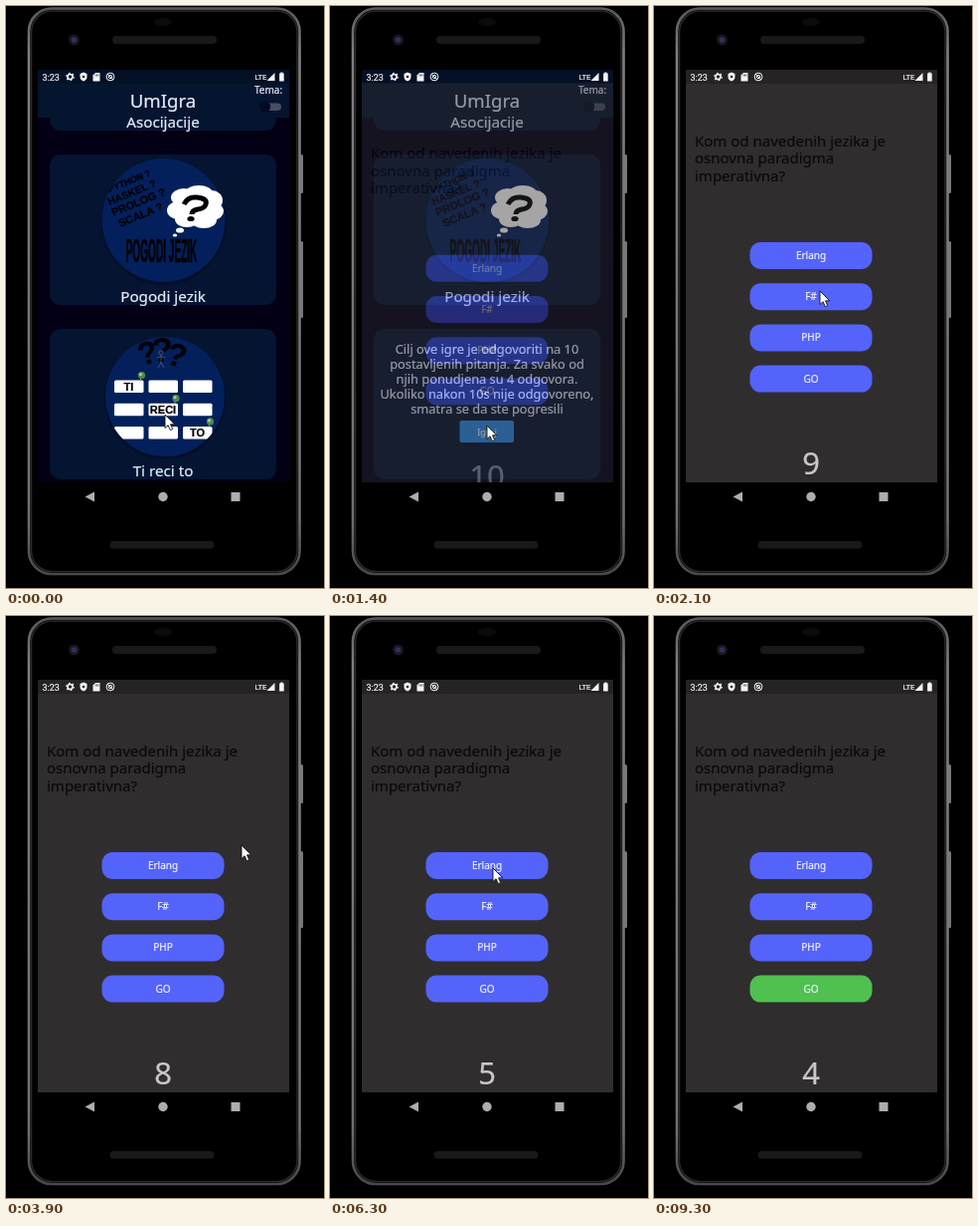
An HTML page for the animation above (9400 ms loop, 320x584 px).

```html
<!DOCTYPE html>
<html lang="sr">
<head>
<meta charset="utf-8">
<title>Quiz app</title>
<style>
html, body { margin: 0; width: 100%; height: 100%; overflow: hidden; background: #000; }
svg { display: block; width: 100vw; height: 100vh; }
text {
  font-family: "Noto Sans", sans-serif; color: #e4eaf8;
  fill: currentColor; stroke: currentColor; stroke-width: .22;
}
.mid { text-anchor: middle; }
.caption { font-size: 15.2px; }
.art text { font-family: "Liberation Sans", Arial, sans-serif; font-weight: bold; color: #020206; }
.card { fill: #041431; }
.status text { font-family: Roboto, sans-serif; color: #f4f4f4; }
.ask text { font-size: 15px; color: #0c0b0c; }
.answer text { font-size: 10px; color: #eef0ff; }
#count { font-size: 31px; color: #c9c8c9; }
</style>
</head>
<body>
<svg viewBox="0 0 320 584">
  <defs>
    <clipPath id="screen"><rect x="32" y="64" width="253" height="414"/></clipPath>
    <clipPath id="disc1"><circle cx="158.5" cy="215" r="62"/></clipPath>
    <clipPath id="disc2"><circle cx="160" cy="392" r="60"/></clipPath>
    <linearGradient id="rim" x2="0" y2="1">
      <stop offset="0" stop-color="#5a5a5c"/>
      <stop offset=".08" stop-color="#808083"/>
      <stop offset=".9" stop-color="#707073"/>
      <stop offset="1" stop-color="#48484a"/>
    </linearGradient>
  </defs>
  <rect width="320" height="584"/>

  <g id="phone">
    <rect x="295" y="149" width="4" height="39" rx="1.5" fill="#77777a"/>
    <rect x="295" y="236" width="4" height="77" rx="1.5" fill="#77777a"/>
    <rect x="23" y="2.500" width="272.500" height="567.500" rx="23" fill="#000" stroke="url(#rim)" stroke-width="2.600"/>
    <rect x="25.500" y="5" width="267.500" height="562.500" rx="21" fill="none" stroke="#28282a" stroke-width="1.500"/>
    <rect x="107" y="30" width="105" height="8" rx="4" fill="#19191c"/>
    <rect x="104.500" y="537" width="105" height="7.500" rx="3.700" fill="#19191c"/>
    <circle cx="68.500" cy="34" r="5.500" fill="#17171d"/>
    <circle cx="68.500" cy="34" r="2.800" fill="#30305c"/>
    <ellipse cx="158" cy="16" rx="9" ry="4" fill="#0b0b0d"/>
  </g>

  <g clip-path="url(#screen)">
    <g id="home">
      <rect x="32" y="64" width="253" height="414" fill="#030016"/>
      <rect class="card" x="44" y="80" width="228" height="45" rx="11"/>
      <rect x="32" y="64" width="253" height="48" fill="#05152f"/>
      <text class="mid caption" x="158" y="122">Asocijacije</text>
      <text class="mid" x="158" y="102" font-size="18.6">UmIgra</text>
      <text x="250" y="87.5" font-size="10">Tema:</text>
      <rect x="257" y="97.500" width="20" height="7.500" rx="3.700" fill="#474e62"/>
      <circle cx="260.500" cy="101" r="5.700" fill="#030b22"/>

      <rect class="card" x="44" y="149" width="228" height="151" rx="11"/>
      <g class="art">
        <circle cx="159" cy="217" r="63" fill="#020a20" opacity=".55"/>
        <circle cx="158.500" cy="215" r="62" fill="#03205c"/>
        <g id="langs" clip-path="url(#disc1)"></g>
        <g id="bubble" fill="#fff"></g>
        <path d="M179 199q4-8 13-7 11 1 9 7-1 4-8 5-6 1-6 5" fill="none" stroke="#020206" stroke-width="5"/>
        <ellipse cx="186" cy="213.500" rx="3.600" ry="2.600" fill="#020206"/>
        <text transform="translate(156.5 257) scale(1 3.3)" font-size="10.1" class="mid">POGODI JEZIK</text>
      </g>
      <text class="mid caption" x="158" y="297">Pogodi jezik</text>

      <g id="front">
        <rect class="card" x="44" y="324" width="228" height="151" rx="11"/>
        <g class="art">
          <circle cx="160" cy="394" r="61" fill="#020a20" opacity=".55"/>
          <circle cx="160" cy="392" r="60" fill="#03205c"/>
          <text class="mid" transform="translate(145 359) rotate(-14)" font-size="32">?</text>
          <text class="mid" x="157" y="357" font-size="35">?</text>
          <text class="mid" transform="translate(169 361) rotate(16)" font-size="32">?</text>
          <path d="M156 350v8m-4-5 4-1 4 1m-7 10 3-5 3 5" fill="none" stroke="#5d6a88" stroke-width=".7"/>
          <circle cx="156" cy="348" r="2.200" fill="#03205c" stroke="#5d6a88" stroke-width=".7"/>
          <g id="tiles" clip-path="url(#disc2)"></g>
          <g id="words"></g>
        </g>
        <text class="mid caption" x="158" y="472">Ti reci to</text>
      </g>

      <g id="back">
        <rect class="card" x="44" y="324" width="228" height="151" rx="11"/>
        <g id="rules" class="mid" font-size="12.8"></g>
        <rect x="130.500" y="416" width="54.500" height="22" rx="2" fill="#2887e2"/>
        <text class="mid" x="158" y="430.500" font-size="9">Igraj</text>
      </g>
    </g>

    <g id="quiz">
      <rect id="quizBg" x="32" y="64" width="253" height="414" fill="#302d2f"/>
      <g id="page">
        <g class="ask" id="ask"></g>
        <g class="answer" id="answers"></g>
        <text id="count" class="mid" x="158" y="470"></text>
      </g>
    </g>
    <rect x="32" y="64" width="253" height="14" opacity=".22"/>
  </g>

  <g class="status" fill="#f4f4f4">
    <text x="36.500" y="74.500" font-size="9">3:23</text>
    <circle cx="64.500" cy="71" r="2.500" fill="none" stroke="#f4f4f4" stroke-width="1.600"/>
    <circle cx="64.500" cy="71" r="3.700" fill="none" stroke="#f4f4f4" stroke-width="1.300" stroke-dasharray="1.6 2.275"/>
    <path d="M78 66.500l3.500 1.500v3q0 3-3.500 4.500-3.500-1.500-3.500-4.500v-3z"/>
    <circle cx="78" cy="71" r="1.300" fill="#222"/>
    <path d="M90 67h4.500v8.500h-7v-6z"/>
    <path d="M90 68.500v2m1.500-2v2m1.500-2v2" stroke="#333" stroke-width=".7"/>
    <circle cx="105" cy="71" r="3.900" fill="none" stroke="#f4f4f4"/>
    <circle cx="105" cy="71" r="1.700" fill="none" stroke="#f4f4f4"/>
    <path d="M102 68l6 6" stroke="#f4f4f4"/>
    <text x="250.500" y="74.200" font-size="7.600">LTE</text>
    <path d="M270.500 67v8h-8z"/>
    <path d="M276.300 66.500h2.200v1h1.200v8h-4.600v-8h1.200z"/>
  </g>
  <g fill="#adadad">
    <path d="M79.500 492.500l9.500-5v10z"/>
    <circle cx="158" cy="492.500" r="4.700"/>
    <rect x="226.500" y="488" width="9" height="9"/>
  </g>

  <path id="cursor" d="M0 0V13.500L3.100 10.700 5.300 15.700 7.700 14.600 5.500 9.800H9.700Z" fill="#fff" stroke="#111" stroke-width=".9"/>
</svg>

<script>
const LOOP = 9400, STEP = 100;
const $ = id => document.getElementById(id);
const fill = (id, items, draw) => { $(id).innerHTML = items.map(draw).join(''); };

fill('langs', [['PYTHON ?', 104, 187, 9], ['HASKEL ?', 104, 200, 10.4], ['PROLOG ?', 108, 211, 11], ['SCALA ?', 115, 222, 11]],
  ([s, x, y, size]) => `<text transform="translate(${x} ${y}) rotate(-22)" font-size="${size}">${s}</text>`);

fill('bubble', [[190, 202, 22, 16], [173, 205, 11, 9], [179, 192, 13, 9], [194, 188, 14, 8], [207, 195, 11, 10],
  [208, 206, 11, 9], [199, 215, 13, 8], [182, 214, 12, 8], [175, 225, 4, 2.6], [170, 230, 2.2, 1.6]],
  ([x, y, rx, ry]) => `<ellipse cx="${x}" cy="${y}" rx="${rx}" ry="${ry}"/>`);

fill('tiles', [...Array(9).keys()], i =>
  `<rect x="${109 + i % 3 * 34.5}" y="${375.5 + Math.floor(i / 3) * 23.2}" width="29.5" height="12.5" rx="1.5" fill="#fff"/>`);

fill('words', ['TI', 'RECI', 'TO'], (s, i) => {
  const x = 123.5 + i * 34.5, y = 386 + i * 23.2;
  return `<text class="mid" x="${x}" y="${y}" font-size="11">${s}</text>
    <circle cx="${x + 13}" cy="${y - 15.5}" r="3.6" fill="#4d8b45"/>
    <circle cx="${x + 12}" cy="${y - 16.5}" r="1.6" fill="#a8c99b"/>
    <path d="M${x + 12} ${y - 12}v2.500" stroke="#9a9f8c"/>`;
});

fill('rules', ['Cilj ove igre je odgovoriti na 10', 'postavljenih pitanja. Za svako od', 'njih ponudjena su 4 odgovora.',
  'Ukoliko nakon 10s nije odgovoreno,', 'smatra se da ste pogresili'],
  (s, i) => `<text x="158" y="${348.5 + i * 15.2}">${s}</text>`);

fill('ask', ['Kom od navedenih jezika je', 'osnovna paradigma', 'imperativna?'],
  (s, i) => `<text x="41" y="${140.5 + i * 17.5}">${s}</text>`);

fill('answers', ['Erlang', 'F#', 'PHP', 'GO'], (s, i) => {
  const y = 237 + i * 41.2;
  return `<rect x="96.500" y="${y}" width="123" height="27" rx="11" fill="#5463fa"/>
    <text class="mid" x="158" y="${y + 17}">${s}</text>`;
});
const correct = $('answers').querySelector('rect:last-of-type');

const clamp = v => Math.min(1, Math.max(0, v));

// CSS-style cubic bezier, solved by bisection
function bezier(x1, y1, x2, y2) {
  const at = (a, b, u) => 3 * a * u * (1 - u) ** 2 + 3 * b * u * u * (1 - u) + u ** 3;
  return x => {
    let lo = 0, hi = 1;
    for (let i = 0; i < 24; i++) {
      const u = (lo + hi) / 2;
      if (at(x1, x2, u) < x) lo = u; else hi = u;
    }
    return at(y1, y2, lo);
  };
}
const easeIn = bezier(.42, 0, 1, 1);
const fastOutSlowIn = bezier(.4, 0, .2, 1);

// Pointer stops: time, x, y
const path = [
  [0, 160, 410], [100, 160, 410], [500, 158, 421], [1800, 158, 421], [2100, 167, 286],
  [2800, 241, 232], [3000, 239, 230], [3800, 237, 230], [3900, 237, 230], [4400, 221, 252],
  [4800, 172, 290], [5100, 166, 300], [5400, 158, 254], [5600, 162, 252], [6200, 162, 252],
  [6300, 164, 253], [6600, 164, 253], [7100, 165, 374], [9400, 165, 374]
];

function pointer(t) {
  const i = Math.max(1, path.findIndex(p => p[0] >= t));
  const [t0, x0, y0] = path[i - 1], [t1, x1, y1] = path[i];
  const k = (t - t0) / (t1 - t0);
  return [x0 + (x1 - x0) * k, y0 + (y1 - y0) * k];
}

function render(t) {
  const flip = clamp((t - 50) / 500);
  const side = Math.abs(Math.cos(flip * Math.PI));
  for (const [id, shown] of [['front', flip < .5], ['back', flip >= .5]]) {
    $(id).style.display = shown ? '' : 'none';
    $(id).setAttribute('transform', `translate(158 0) scale(${Math.max(side, .001)} 1) translate(-158 0)`);
  }

  const enter = clamp((t - 1220) / 300);
  $('quiz').setAttribute('opacity', enter < 1 ? easeIn(enter) : 1);
  const rise = enter < 1 ? (1 - fastOutSlowIn(enter)) * 103.5 : 0;
  $('quizBg').setAttribute('y', 64 + rise);
  $('page').setAttribute('transform', `translate(0 ${rise})`);

  $('count').textContent = Math.min(10, Math.max(4, 11 - Math.floor(t / 1000)));
  correct.setAttribute('fill', t >= 7800 ? '#50c050' : '#5463fa');

  $('cursor').setAttribute('transform', `translate(${pointer(t)})`);
  $('cursor').style.display = t < 9100 ? '' : 'none';
}

const start = performance.now();
function tick() {
  const t = (performance.now() - start) % LOOP;
  render(Math.floor(t / STEP) * STEP);
  requestAnimationFrame(tick);
}
tick();
</script>
</body>
</html>
```
